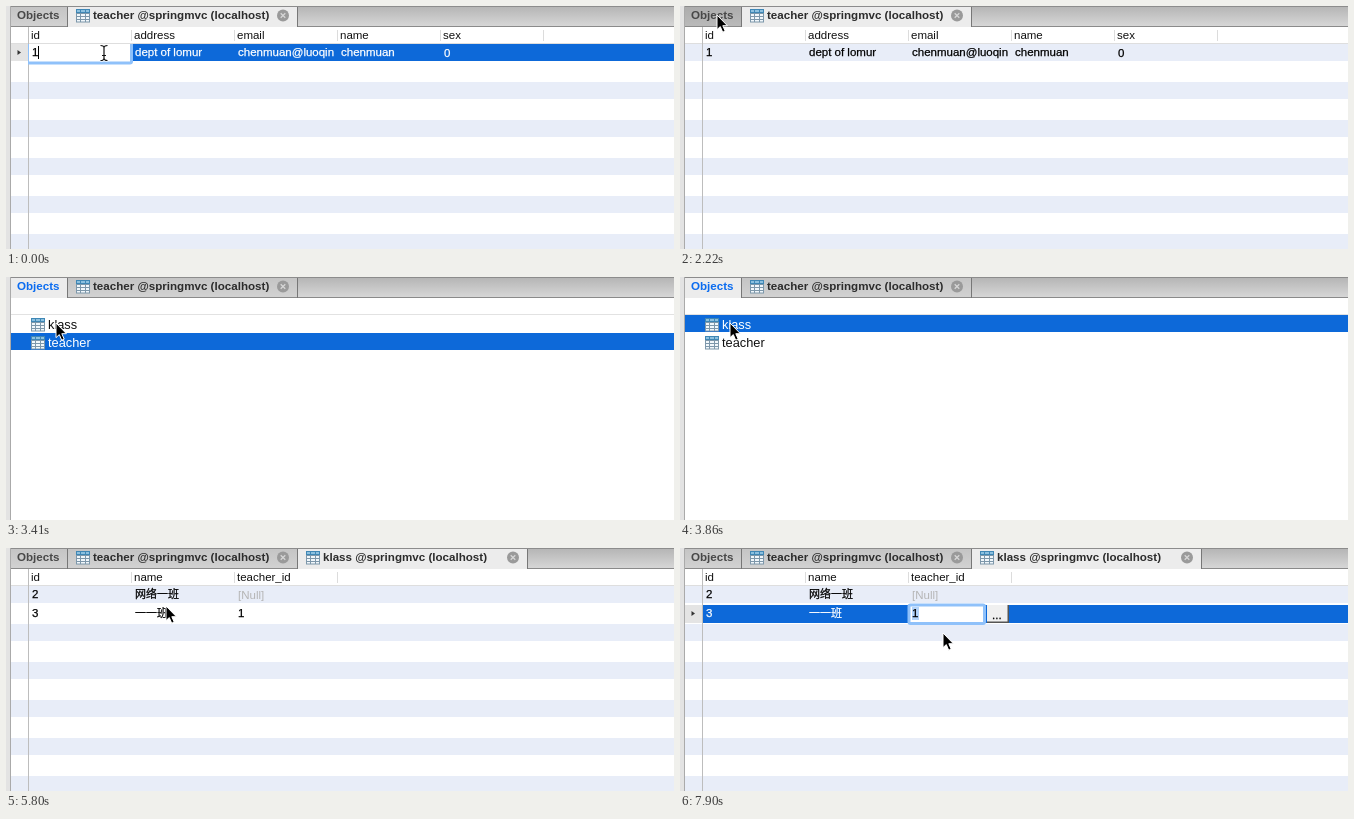
Write an HTML page that moves like this. It is 668 px wide and 243 px high and loops after 8 s.

```html
<!DOCTYPE html>
<html lang="en">
<head>
<meta charset="utf-8">
<title>Table editor</title>
<style>
html, body { margin: 0; width: 100%; height: 100%; overflow: hidden; background: #fff; }
svg { display: block; width: 668px; height: 243px; }
text { font: 11.5px "Liberation Sans", Arial, sans-serif; fill: #111; white-space: pre; }
.tab { font-size: 11.6px; font-weight: bold; fill: #2c2c2c; }
.idle { fill: #484848; }
.front { fill: #0b6cf0; }
.list { font-size: 12.8px; }
.cell { fill: #000; stroke: #000; stroke-width: .25px; }
.cjk { font: 11px "Noto Sans CJK SC", "Noto Sans CJK", sans-serif; }
.on { fill: #fff; }
.cell.on { stroke: #fff; }
.null { fill: #b4b4b4; }
</style>
</head>
<body>
<svg viewBox="0 0 668 243" xmlns="http://www.w3.org/2000/svg">
  <defs>
    <linearGradient id="bar" x2="0" y2="1">
      <stop offset="0" stop-color="#b4b4b4"/><stop offset="1" stop-color="#d8d8d8"/>
    </linearGradient>
    <linearGradient id="rest" x2="0" y2="1">
      <stop offset="0" stop-color="#c4c4c4"/><stop offset="1" stop-color="#d2d2d2"/>
    </linearGradient>
    <linearGradient id="hover" x2="0" y2="1">
      <stop offset="0" stop-color="#acacac"/><stop offset="1" stop-color="#bababa"/>
    </linearGradient>
    <clipPath id="mail"><path d="M229 38H328V56H229Z"/></clipPath>
    <clipPath id="body"><path d="M22 38H668V243H22Z"/></clipPath>
    <g id="icon">
      <rect width="14" height="13.5" fill="#7d97aa"/>
      <rect width="14" height="4" fill="#3f87b5"/>
      <path d="M1 5h3v2H1zM5 5h4v2H5zM10 5h3v2h-3zM1 8h3v2H1zM5 8h4v2H5zM10 8h3v2h-3zM1 11h3v1.5H1zM5 11h4v1.5H5zM10 11h3v1.5h-3z" fill="#f1f7fb"/>
      <path d="M1 1h3v2H1zM5 1h4v2H5zM10 1h3v2h-3z" fill="#8cc0df"/>
    </g>
    <g id="close">
      <circle r="6" fill="#9a9a9a"/>
      <path d="M-2.3-2.3 2.3 2.3M2.3-2.3-2.3 2.3" stroke="#d6d6d6" stroke-width="1.3"/>
    </g>
    <path id="arrow" d="M0 0V14.6L3.3 11.6 5.7 17.2 8.2 16.1 5.8 10.7H10.4Z" fill="#000" stroke="#fff" stroke-width="1" stroke-linejoin="round"/>
    <g id="beam" fill="none">
      <path d="M-3.5-7.5Q0-7.5 0-5Q0-7.5 3.5-7.5M0-5V5M-3.5 7.5Q0 7.5 0 5Q0 7.5 3.5 7.5M-2 2.5H2" stroke="#fff" stroke-width="2.6" stroke-opacity=".7"/>
      <path d="M-3.5-7.5Q0-7.5 0-5Q0-7.5 3.5-7.5M0-5V5M-3.5 7.5Q0 7.5 0 5Q0 7.5 3.5 7.5M-2 2.5H2" stroke="#111" stroke-width="1.2"/>
    </g>
  </defs>
  <g id="scene"></g>
  <use id="mouse"/>
</svg>
<script>
const LOOP = 8000;
const BLUE = '#0d69d9';

// Pointer: time, x, y, shape
const moves = [
  [0, 98, 47, 'beam'],
  [150, 44, 5, 'arrow'], [300, 12, 35, 'arrow'],
  [590, 44, 60, 'arrow'], [740, 70, 73, 'arrow'],
  [1930, 53, 46, 'arrow'], [2080, 41, 16, 'arrow'], [2220, 37, 9, 'arrow'],
  [3120, 16, 48, 'arrow'], [3270, 2, 84, 'arrow'], [3410, 50, 46, 'arrow'],
  [5650, 84, 51, 'arrow'], [5800, 160, 58, 'arrow'], [5950, 226, 63, 'arrow'], [6100, 255, 64, 'arrow'],
  [6400, 273, 67, 'beam'], [6550, 262, 67, 'beam'], [6700, 236, 65, 'beam'], [6850, 180, 58, 'beam'],
  [7000, 108, 46, 'beam'], [7150, 55, 38, 'beam'], [7300, 33, 49, 'beam'],
  [7450, 92, 58, 'arrow'], [7600, 182, 71, 'arrow'], [7750, 242, 81, 'arrow'], [7900, 263, 85, 'arrow']
];

const rect = (x, y, w, h, fill, more = '') =>
  `<rect x="${x}" y="${y}" width="${w}" height="${h}" fill="${fill}" ${more}/>`;
const text = (x, y, s, cls = '') => `<text x="${x}" y="${y}" class="${cls}">${s}</text>`;
const cell = (x, y, s, cls = '') => text(x, y, s, 'cell ' + cls);
const use = (id, x, y) => `<use href="#${id}" x="${x}" y="${y}"/>`;

function spinner(phase) {
  let out = '';
  for (let i = 0; i < 12; i++) {
    const shade = 0.15 + 0.8 * ((i - phase + 24) % 12) / 11;
    out += `<path d="M0-3.6V-7" transform="translate(306.5 8.5) rotate(${i * 30})" stroke="#333" stroke-width="1.5" stroke-opacity="${shade}"/>`;
  }
  return out;
}

function tab(x, w, active, fill) {
  return rect(x, 0, w, 21, active ? '#ececec' : `url(#${fill || 'rest'})`) +
    (active ? '' : rect(x, 20, w, 1, '#8a8a8a')) + rect(x + w, 0, 1, 21, '#777');
}

function tabs(front, hover, third, phase) {
  let out = rect(0, 0, 668, 21, 'url(#bar)') + rect(0, 20, 668, 1, '#8a8a8a') +
    tab(5, 56, front === 0, hover && 'hover') + text(11, 13, 'Objects', 'tab ' + (front ? 'idle' : 'front')) +
    tab(62, 229, front === 1) + use('icon', 70, 3) +
    text(87, 13, 'teacher @springmvc (localhost)', 'tab') + use('close', 277, 9.5);
  if (third) {
    out += tab(292, 229, true) + (phase < 0 ? use('icon', 300, 3) : spinner(phase)) +
      text(317, 13, 'klass @springmvc (localhost)', 'tab') + use('close', 507, 9.5);
  }
  return out + rect(0, 0, 668, 1, '#8c8c8c');
}

function grid(heads) {
  let out = '';
  for (let y = 38; y < 243; y += 38) out += rect(5, y, 663, 17, '#e8edf8');
  if (heads.length) out += rect(5, 37, 663, 1, '#dedede');
  heads.forEach((h, i) => {
    out += text(25 + i * 103, 33, h) + rect(125 + i * 103, 24, 1, 11, '#dcdcdc');
  });
  return out + rect(22, 21, 1, 222, '#bdbdbd');
}

const selected = (y, h) => rect(5, y, 17, h, '#e4e4e4') + rect(23, y, 645, h, BLUE) +
  `<path d="M11.5 ${y + 6}v5l3.5-2.5z" fill="#333"/>`;

const field = (x, y, w, h) =>
  rect(x, y, w, h, '#fff', 'stroke="#8fc1fa" stroke-width="3" rx="1.5" clip-path="url(#body)"');

function teacher(t) {
  const edit = t < 1030, cls = edit ? 'on' : '';
  return grid(['id', 'address', 'email', 'name', 'sex']) +
    (edit ? selected(38, 17) + field(21.5, 35, 104, 22) + rect(32, 40, 1, 13, '#000') : '') +
    cell(26, 50, '1') + cell(129, 50, 'dept of lomur', cls) +
    `<g clip-path="url(#mail)">${cell(232, 50, 'chenmuan@luoqinweb', cls)}</g>` +
    cell(335, 50, 'chenmuan', cls) + cell(438, 51, '0', cls);
}

function list(row) {
  let out = rect(5, 37, 663, 1, '#e2e2e2') + rect(4, 38 + 18 * row, 664, 17, BLUE);
  ['klass', 'teacher'].forEach((name, i) => {
    out += use('icon', 25, 41 + i * 18) + text(42, 52 + i * 18, name, 'list' + (i === row ? ' on' : ''));
  });
  return out;
}

function klass(t) {
  if (t < 5200) return grid([]);
  const edit = t >= 6400, cls = edit ? 'on' : '';
  let out = grid(['id', 'name', 'teacher_id']) + (edit ? selected(57, 18) : '') +
    cell(26, 50, '2') + cell(129, 50, '网络一班', 'cjk') + text(232, 51, '[Null]', 'null') +
    cell(26, 69, '3', cls) + cell(129, 69, '一一班', 'cjk ' + cls);
  if (edit) {
    out += field(229, 57, 75.5, 18.5) +
      (t < 6700 ? rect(233, 59, 1, 13, '#000') : rect(232, 59, 7, 13, '#b3d4fb')) +
      rect(307, 57, 22, 18, '#555') + rect(307, 57, 20.5, 16.5, '#f0f0f0') +
      cell(312, 71, '...');
  }
  return out + cell(232, 69, '1');
}

function scene(t) {
  let body;
  if (t < 2670) body = tabs(1, t >= 2080) + teacher(t);
  else if (t < 4910) body = tabs(0) + list(t < 3860 ? 1 : 0);
  else body = tabs(2, false, true, t < 5060 ? 0 : t < 5200 ? 2 : -1) + klass(t);
  return rect(0, 0, 668, 243, '#fff') + body + rect(0, 0, 4, 243, '#e3e3e3') + rect(4, 0, 1, 243, '#aaa');
}

const stage = document.getElementById('scene');
const mouse = document.getElementById('mouse');
let shown = '';

function draw(t) {
  const next = scene(t);
  if (next !== shown) stage.innerHTML = shown = next;
  const [, x, y, shape] = moves.findLast(m => m[0] <= t);
  mouse.setAttribute('href', '#' + shape);
  mouse.setAttribute('x', x);
  mouse.setAttribute('y', y);
}

const start = performance.now();
function tick() {
  draw((performance.now() - start) % LOOP);
  requestAnimationFrame(tick);
}
tick();
</script>
</body>
</html>
```
